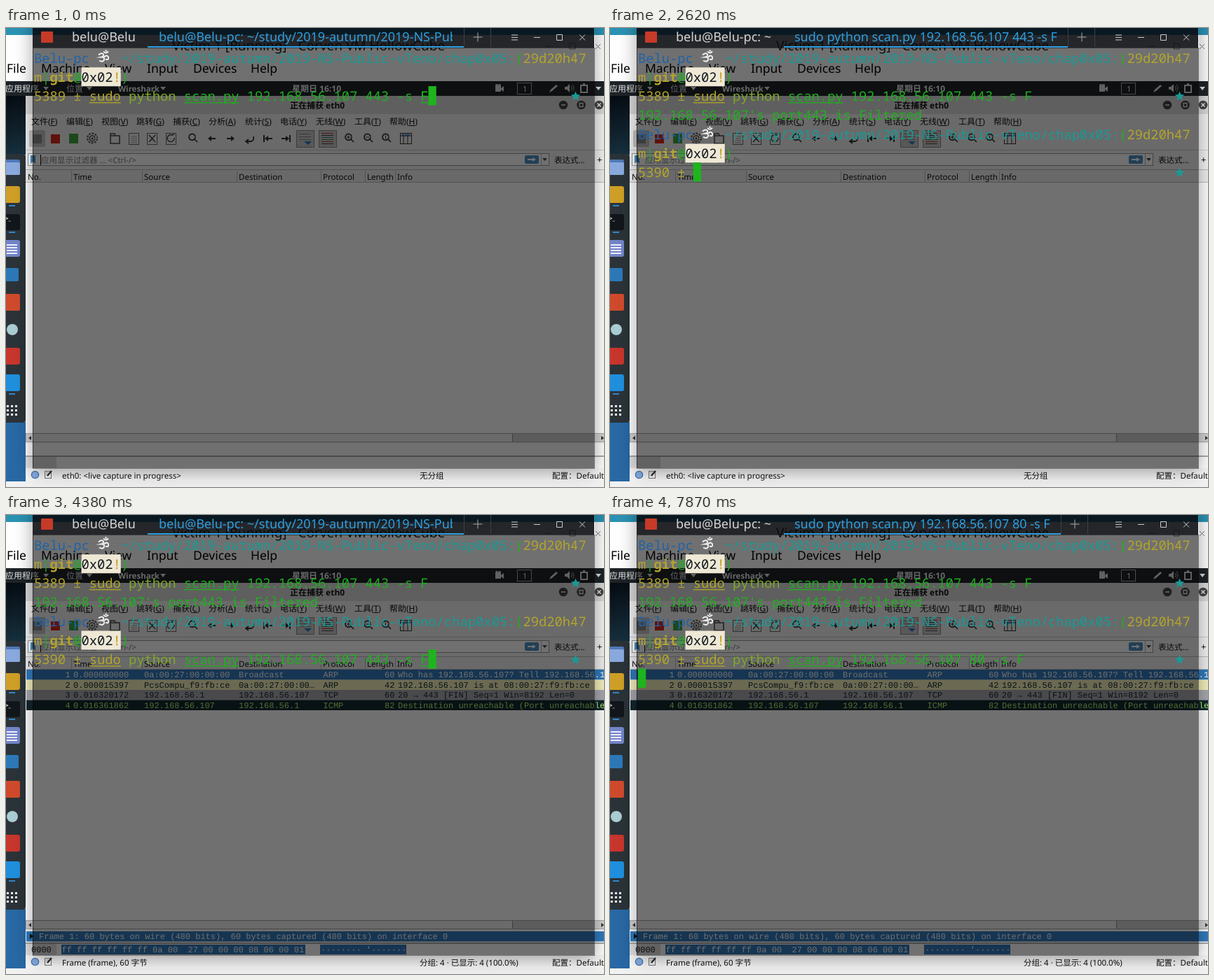
An HTML page with a canvas for the animation above (8 s loop, 853 by 656 pixels).

```html
<!DOCTYPE html>
<html lang="zh">
<head>
<meta charset="utf-8">
<title>Port scan</title>
<style>
  html, body { margin: 0; width: 100%; height: 100%; overflow: hidden; background: #eee; }
  canvas { display: block; width: 853px; height: 656px; }
</style>
</head>
<body>
<canvas id="stage" width="853" height="656"></canvas>
<script>
const g = document.getElementById('stage').getContext('2d');
g.textRendering = 'geometricPrecision';

const LOOP = 8000;
const SANS = '"Noto Sans", "Noto Sans CJK SC", sans-serif';
const TERM = '18.75px "Noto Sans Mono", "DejaVu Sans Mono", monospace';
const LIST = '12px "Liberation Mono", monospace';
const BLUE = '#2063a8', TEAL = '#189a96', YELLOW = '#b2a42c', GREEN = '#1fb01f';
const SELECT = '#327abc';

// ---- timeline -------------------------------------------------------------
const SCAN = 'sudo python scan.py 192.168.56.107 ';
const steps = [
  [0, { first: '443 -s F', second: null, row: 2, col: 50, cursor: true, title: null,
        output: false, prompt: false, packets: 0 }],
  [50, { cursor: false }],
  [490, { cursor: true }],
  [540, { first: '443 -s ', col: 49 }],
  [750, { first: '443 -s', col: 48 }],
  [1040, { first: '443 -s ', col: 49 }],
  [1290, { first: '443 -s F', col: 50 }],
  [1500, { row: 3, col: 0 }],
  [1600, { title: SCAN + '443 -s F' }],
  [2120, { cursor: false }],
  [2450, { output: true }],
  [2620, { prompt: true, row: 6, col: 7, cursor: true }],
  [2670, { title: null }],
  [2720, { packets: 2 }],
  [3150, { packets: 4 }],
  [3340, { cursor: false }],
  [3920, { cursor: true }],
  [4110, { second: '443 -s F', col: 50 }],
  [4610, { cursor: false }],
  [4800, { cursor: true, col: 49 }],
  [4900, { col: 48 }],
  [5010, { col: 47 }],
  [5110, { col: 46 }],
  [5210, { col: 45 }],
  [5580, { second: '44 -s F', col: 44 }],
  [5730, { second: '4 -s F', col: 43 }],
  [5890, { second: ' -s F', col: 42 }],
  [6200, { second: '8 -s F', col: 43 }],
  [6410, { second: '80 -s F', col: 44 }],
  [6680, { row: 7, col: 0 }],
  [6730, { title: SCAN + '80 -s F' }],
  [7230, { cursor: false }],
  [7820, { cursor: true }]
];
const caretFlips = [280, 850, 1430, 2020, 2620, 3210, 3790, 4380, 4960, 5530, 6100, 6730, 7280, 7870];

function stateAt(t) {
  const state = Object.assign({}, ...steps.filter(s => s[0] <= t).map(s => s[1]));
  state.caret = caretFlips.filter(f => f <= t).length % 2 === 0;
  return state;
}

// ---- drawing helpers ------------------------------------------------------
function rect(x, y, w, h, color) {
  g.fillStyle = color;
  g.fillRect(x, y, w, h);
}
function box(x, y, w, h, color, width = 1) {
  g.strokeStyle = color;
  g.lineWidth = width;
  g.strokeRect(x + .5, y + .5, w, h);
}
function rounded(x, y, w, h, r, color) {
  g.fillStyle = color;
  g.beginPath();
  g.roundRect(x, y, w, h, r);
  g.fill();
}
function disc(x, y, r, color) {
  g.fillStyle = color;
  g.beginPath();
  g.arc(x, y, r, 0, 7);
  g.fill();
}
function path(d, color, width, x = 0, y = 0) {
  g.save();
  g.translate(x, y);
  const shape = new Path2D(d);
  if (width) {
    g.strokeStyle = color;
    g.lineWidth = width;
    g.stroke(shape);
  } else {
    g.fillStyle = color;
    g.fill(shape);
  }
  g.restore();
}
function text(str, x, y, color, size = 11.5, weight = 400) {
  g.font = `${weight} ${size}px ${SANS}`;
  g.fillStyle = color;
  g.fillText(str, x, y);
  return g.measureText(str).width;
}
function grid(str, x, y, color, pitch, font) {
  g.font = font;
  g.fillStyle = color;
  [...str].forEach((ch, i) => g.fillText(ch, x + i * pitch, y));
}
const listText = (str, x, y, color) => grid(str, x, y, color, 7.2, LIST);

// ---- desktop and virtual machine -----------------------------------------
function drawDesktop() {
  rect(0, 0, 853, 656, '#f2f2f2');
  rect(0, 0, 853, 10, '#2b93b4');
  rect(0, 10, 853, 66, '#fff');
  text('Victim 1 [Running] - Corven VM HollowCube', 237, 32, '#222', 19);
  path('M769 26h8M804 22h8v8h-8zM841 23l7 7m0-7l-7 7', '#777', 1);
  [['File', 1], ['Machine', 50], ['View', 141], ['Input', 201], ['Devices', 267], ['Help', 349]]
    .forEach(([label, x]) => text(label, x, 63.5, '#000', 17.5));

  rect(0, 76, 853, 21, '#1d2327');
  text('应用程序', -1, 90.5, '#eee', 12, 500);
  text('位置', 86, 90.5, '#ddd', 12, 500);
  text('Wireshark', 160, 90.5, '#eee', 11.5, 600);
  text('星期日 16:10', 408, 90.5, '#eee', 12, 600);
  for (const x of [57, 119, 224, 845]) path('M-4-2h8l-4 5z', '#ddd', 0, x, 86);
  path('M698 83h8v8h-8zM706 86l4-3v8l-4-3z', '#ddd');
  disc(700, 82, 2, '#ddd');
  disc(704, 82, 2, '#ddd');
  box(729, 78, 20, 16, '#aaa');
  text('1', 737, 90.5, '#eee', 11);
  path('M775 92l2-4 8-7 2 2-8 7zM797 84h3l4-4v12l-4-4h-3z', '#ddd');
  path('M806 83q3 3 0 6M808 81q4 5 0 10', '#aaa', 1);
  path('M820 82h9v10h-9zM823 80h3', '#ddd', 2);
}

function drawDock() {
  const sky = g.createLinearGradient(0, 97, 28, 180);
  sky.addColorStop(0, '#050a10');
  sky.addColorStop(1, '#17313f');
  rect(0, 97, 28, 84, sky);
  rect(0, 563, 28, 85, '#2868a4');
  rounded(-8, 180, 36, 384, 4, '#2b3338');

  rounded(-4, 188, 24, 22, 2, '#4f78b8');
  rounded(-4, 192, 24, 18, 2, '#8aa9de');
  rounded(-4, 226, 24, 24, 3, '#cf9f26');
  rounded(-4, 266, 24, 23, 3, '#11161a');
  text('>_', -1, 275, '#eee', 8, 700);
  rounded(-4, 303, 24, 24, 3, '#7285c9');
  for (let y = 309; y < 323; y += 4) rect(1, y, 15, 2, '#eef');
  rounded(-1, 343, 19, 19, 2, '#2c78b8');
  rounded(-4, 380, 24, 24, 2, '#d04a2c');
  disc(9, 431, 8, '#a9cdd2');
  rounded(-4, 457, 24, 24, 3, '#c8352c');
  rounded(-4, 495, 24, 24, 3, '#1f8fdd');
  for (const y of [253, 291, 522]) rect(4, y, 9, 2, '#3585c8');
  for (let i = 0; i < 9; i++) rect(i % 3 * 6 + 1, 539 + Math.floor(i / 3) * 6, 3, 3, '#eee');
}

// ---- packet analyser ------------------------------------------------------
function drawToolbar() {
  const ink = '#333';
  rounded(33, 146, 23, 24, 2, '#c4c4c4');
  rect(38, 152, 13, 13, '#8a8a8a');
  rect(64, 152, 13, 13, '#d8281c');
  rect(90, 151, 13, 14, '#3fa53f');
  g.setLineDash([3, 1.5]);
  path('M130 158a7 7 0 1 1-.01-1', '#555', 2);
  g.setLineDash([]);
  path('M127 158a4 4 0 1 1-.01-.5', '#555', 1.5);
  disc(123, 158, 1.7, '#555');
  path('M149 154v11h13v-11zM149 154v-3h6l1 3', '#444', 1.5);
  for (const x of [175, 201, 228]) box(x, 150, 14, 16, '#666');
  for (let y = 155; y < 165; y += 3) path(`M178 ${y}h9`, '#999', 1);
  path('M204 153l9 10m0-10l-9 10M240 157a5 5 0 1 1-3-4l3-1', '#444', 1.5);

  const lens = (x, mark) => {
    path('M4 0a4.5 4.5 0 1 1-.01-.5M3 3l4 4', ink, 1.7, x - 1, 156);
    if (mark) path(mark, ink, 1, x - 1, 156);
  };
  lens(267);
  lens(490, 'M-3 0h5M-.5-2.5v5');
  lens(517, 'M-3 0h5');
  lens(543, 'M-.5-2.5v5');
  const back = 'M-6 0l5-4v3h6v2h-6v3z', forward = 'M6 0l-5-4v3h-6v2h6v3z';
  path(back, ink, 0, 294, 158);
  path(forward, ink, 0, 320, 158);
  path('M343 162h7q4-1 3-7M346 159l-4 3 4 3', ink, 1.8);
  path(back, ink, 0, 375, 158);
  rect(367, 153, 2, 10, ink);
  path(forward, ink, 0, 398, 158);
  rect(404, 153, 2, 10, ink);

  for (const x of [414, 446]) {
    rounded(x, 146, 25, 24, 2, '#cacaca');
    box(x, 146, 25, 24, '#888');
  }
  for (let i = 0; i < 6; i++) rect(450, 150 + i * 3, 17, 1, ['#b33', '#444', '#47a', '#383'][i % 4]);
  for (let i = 0; i < 3; i++) rect(418, 151 + i * 4, 17, 1, '#888');
  path('M425 162h11l-5 5z', SELECT);
  box(562, 150, 16, 15, ink);
  path('M562 154h17M567 150v16M573 150v16', ink, 1);
  path('M565 152l3 3 3-3M570 152l3 3 3-3', SELECT, 1.5);
}

const ARP = '#f4f0bc', DARK = '#12272e';
const packets = [
  ['0.000000000', '0a:00:27:00:00:00', 'Broadcast', 'ARP', '60', 'Who has 192.168.56.107? Tell 192.168.56.1', ARP, DARK],
  ['0.000015397', 'PcsCompu_f9:fb:ce', '0a:00:27:00:00…', 'ARP', '42', '192.168.56.107 is at 08:00:27:f9:fb:ce', ARP, DARK],
  ['0.016320172', '192.168.56.1', '192.168.56.107', 'TCP', '60', '20 → 443 [FIN] Seq=1 Win=8192 Len=0', '#a8a8b0', DARK],
  ['0.016361862', '192.168.56.107', '192.168.56.1', 'ICMP', '82', 'Destination unreachable (Port unreachable)', DARK, '#b7f774']
];

function drawPackets(count) {
  packets.slice(0, count).forEach(([time, from, to, protocol, length, info, back, ink], i) => {
    const selected = i === 0 && count === 4;
    const top = 221 + i * 14.5, base = top + 11;
    const color = selected ? '#fff' : ink;
    rect(29, top, 824, 14.5, selected ? SELECT : back);
    [[String(i + 1), 84.5], [time, 96], [from, 197], [to, 332], [protocol, 452.5], [length, 540], [info, 559]]
      .forEach(([str, x]) => listText(str, x, base, color));
  });
}

function drawAnalyser(s) {
  const ink = '#111', rule = '#bbb';
  rect(28, 97, 825, 551, '#f3f3f3');
  rect(28, 97, 825, 26, '#d9d9d9');
  text('正在捕获 eth0', 405, 115, ink, 12, 700);
  for (const x of [795, 820.5, 846]) disc(x, 110, 6.3, '#444');
  path('M792 110h6M818 107.5h5v5h-5zM843.5 107.5l5 5m0-5l-5 5', '#eee', 1.3);

  const menus = { 36: '文件F', 86: '编辑E', 136: '视图V', 186: '跳转G', 238: '捕获C', 289: '分析A',
                  341: '统计S', 391: '电话Y', 442: '无线W', 497: '工具T', 547: '帮助H' };
  for (const [left, label] of Object.entries(menus)) {
    const x = +left;
    const start = x + text(label.slice(0, 2) + '(', x, 137.5, ink, 12);
    const width = text(label[2], start, 137.5, ink, 12);
    rect(start, 139, width, 1, ink);
    text(')', start + width, 137.5, ink, 12);
  }
  drawToolbar();

  rect(28, 174, 825, 1, '#ccc');
  rect(31, 179, 743, 18, '#fff');
  box(31, 179, 743, 17, '#999');
  path('M35 182h7v12l-3.5-3-3.5 3z', '#4b8fc4');
  text('应用显示过滤器 … <Ctrl-/>', 50, 193, '#777', 11.5);
  if (s.caret) rect(49, 181, 1, 15, '#000');
  rounded(740, 182, 20, 12, 2, '#4b8fc4');
  path('M744 187h7v-2l5 3-5 3v-2h-7z', '#fff');
  rect(763, 180, 1, 16, '#bbb');
  path('M765 186h7l-3.5 4z', '#444');
  text('表达式…', 782, 193, ink, 11.5);
  text('+', 843, 193, ink, 13);

  rect(28, 203, 825, 377, '#fff');
  rect(28, 203, 825, 18, '#efefef');
  rect(28, 202, 825, 1, rule);
  rect(28, 220, 825, 1, rule);
  for (const x of [93, 194, 329, 449, 512, 555]) rect(x, 204, 1, 16, rule);
  [['No.', 31], ['Time', 96], ['Source', 197], ['Destination', 332], ['Protocol', 452], ['Length', 515], ['Info', 558]]
    .forEach(([label, x]) => text(label, x, 216.5, ink));
  drawPackets(s.packets);

  rect(28, 579, 825, 13, '#d2d2d2');
  rect(38, 580, 685, 11, '#f2f2f2');
  box(28, 579, 825, 12, '#aaa');
  rect(722, 580, 1, 11, '#888');
  path('M36 583v6l-4-3zM849 583v6l4-3z', '#333');
  rect(28, 594, 825, 17, '#fff');
  rect(28, 611, 825, 2, '#aaa');
  rect(28, 613, 825, 16, '#fff');
  rect(28, 613, 44, 16, '#e0e0e0');

  const detailed = s.packets === 4;
  if (detailed) {
    rect(29, 595, 824, 14.5, SELECT);
    path('M34 598v8l5-4z', '#111');
    listText('Frame 1: 60 bytes on wire (480 bits), 60 bytes captured (480 bits) on interface 0', 47, 606, '#fff');
    listText('0000', 36, 625, '#222');
    rect(79, 614, 348, 14, SELECT);
    rect(448, 614, 123, 14, SELECT);
    listText('ff ff ff ff ff ff 0a 00  27 00 00 00 08 06 00 01', 79.5, 625, '#fff');
    listText("········ '·······", 449, 625, '#fff');
  }

  rect(28, 629, 825, 19, '#f6f6f6');
  disc(41.5, 638.5, 5.8, '#456fae');
  disc(41.5, 638.5, 4.5, '#85aee4');
  box(55, 633, 9, 10, '#777');
  path('M57 636h5M57 639h4', '#999', 1);
  path('M59 640l6-7', '#222', 2);
  text(detailed ? 'Frame (frame), 60 字节' : 'eth0: <live capture in progress>', 80, 643.5, ink);
  const n = s.packets;
  text(n ? `分组: ${n} · 已显示: ${n} (100.0%)` : '无分组', 590, 643.5, ink);
  text('配置：Default', 779, 643.5, ink);
}

// ---- translucent terminal -------------------------------------------------
const CELL = 11.25, LINE = 27.3;
const colX = col => 40 + col * CELL;
const rowY = row => 28.5 + row * LINE;

function put(row, col, str, color, underline) {
  grid(str, colX(col), rowY(row) + 21, color, CELL, TERM);
  if (underline) rect(colX(col), rowY(row) + 23, str.length * CELL, 1.3, color);
}

function drawPrompt(row) {
  put(row, 0, 'Belu-pc', BLUE);
  const x = 131, y = rowY(row) + 4;
  path('M1 6q4-4 7-1 1 3-3 4 5 0 4 4-2 4-7 1M9 9q4-4 6 0 1 5-4 3M8 1q3 4 7 0', '#f2f2f2', 1.9, x, y);
  disc(x + 11.5, y, 1.2, '#f2f2f2');
  put(row, 11, '~/study/2019-autumn/2019-NS-Public-vTeno/chap0x05:', TEAL);
  put(row, 61, '(', GREEN);
  put(row, 62, '29d20h47', YELLOW);

  put(row + 1, 0, 'm', YELLOW);
  put(row + 1, 1, '|', GREEN);
  grid('git', colX(2), rowY(row + 1) + 21, YELLOW, CELL, '700 ' + TERM);
  put(row + 1, 5, '@', GREEN);
  rect(colX(6), rowY(row + 1) + .5, 5 * CELL, 27, '#eee8d5');
  put(row + 1, 6, '0x02', '#101820');
  put(row + 1, 10, '!', '#c2a020');
  put(row + 1, 11, ')', GREEN);
}

function drawStar(row) {
  const points = Array.from({ length: 10 }, (_, i) => {
    const a = i * Math.PI / 5 - Math.PI / 2, r = i % 2 ? 3.2 : 7;
    return `${r * Math.cos(a)} ${r * Math.sin(a)}`;
  });
  path(`M${points.join('L')}Z`, TEAL, 0, 812.5, rowY(row) + 14.5);
}

function drawCommand(row, number, args, editing) {
  put(row, 0, number + ' ±', YELLOW);
  drawStar(row);
  if (args === null) return;
  put(row, 7, 'sudo', '#b0a626', true);
  put(row, 12, 'python', '#7fa82a');
  put(row, 19, 'scan.py', GREEN, true);
  put(row, 27, '192.168.56.107', GREEN);
  put(row, 42, args, GREEN);
  if (editing && args.endsWith('F')) put(row, 41 + args.length, 'F', GREEN, true);
}

function drawTabs(title) {
  const active = '#2d9fe0', pale = '#d4d4d4';
  rect(38, 0, 801, 28, 'rgba(6,9,13,.88)');
  rounded(50, 5, 17, 16, 1, '#c63a28');
  text(title ? 'belu@Belu-pc: ~' : 'belu@Belu', 94, 19, pale, 18);
  let left = 202, right = 653;
  if (title) {
    left = 248;
    right = Math.round(263 + text(title, 263, 19, active, 18) + 15);
  } else {
    g.save();
    g.beginPath();
    g.rect(left, 0, 435, 28);
    g.clip();
    text('belu@Belu-pc: ~/study/2019-autumn/2019-NS-Public-vTeno', 218, 19, active, 18);
    g.restore();
  }
  rect(left, 26, right - left, 2, active);
  rect(right, 0, 1, 27, '#39424a');
  rect(right + 38, 0, 1, 27, '#39424a');
  path('M-6.5 0h13M0-6.5v13', '#aaa', 1, right + 20, 13);
  path('M721 10h9M721 13.5h9M721 17h9M753 13.5h9M785.5 9.5h8v8h-8zM818 9.5l8 8m0-8l-8 8', '#ccc', 1);
}

// The window is translucent, so its shadow is kept outside its edges.
function drawShadow() {
  g.save();
  g.beginPath();
  g.rect(0, 0, 853, 656);
  g.rect(38, 0, 802, 630);
  g.clip('evenodd');
  g.shadowColor = 'rgba(0,0,0,.36)';
  g.shadowBlur = 24;
  g.shadowOffsetY = 5;
  rect(38, -40, 802, 670, '#000');
  g.restore();
}

function drawTerminal(s) {
  drawShadow();
  rect(38, 28, 801, 601, 'rgba(0,0,0,.56)');
  box(38, 28, 801, 601, 'rgba(0,0,0,.5)');
  drawTabs(s.title);
  drawPrompt(0);
  drawCommand(2, '5389', s.first, s.row === 2);
  if (s.output) put(3, 0, "192.168.56.107's port443 is Filtered", GREEN);
  if (s.prompt) {
    drawPrompt(4);
    drawCommand(6, '5390', s.second, s.row === 6);
  }
  if (s.cursor) rect(colX(s.col), rowY(s.row), CELL, LINE, '#1eb41e');
}

const start = performance.now();
let shown = '';
function frame() {
  const state = stateAt((performance.now() - start) % LOOP);
  const key = JSON.stringify(state);
  if (key !== shown) {
    shown = key;
    drawDesktop();
    drawDock();
    drawAnalyser(state);
    drawTerminal(state);
  }
  requestAnimationFrame(frame);
}
frame();
</script>
</body>
</html>
```
